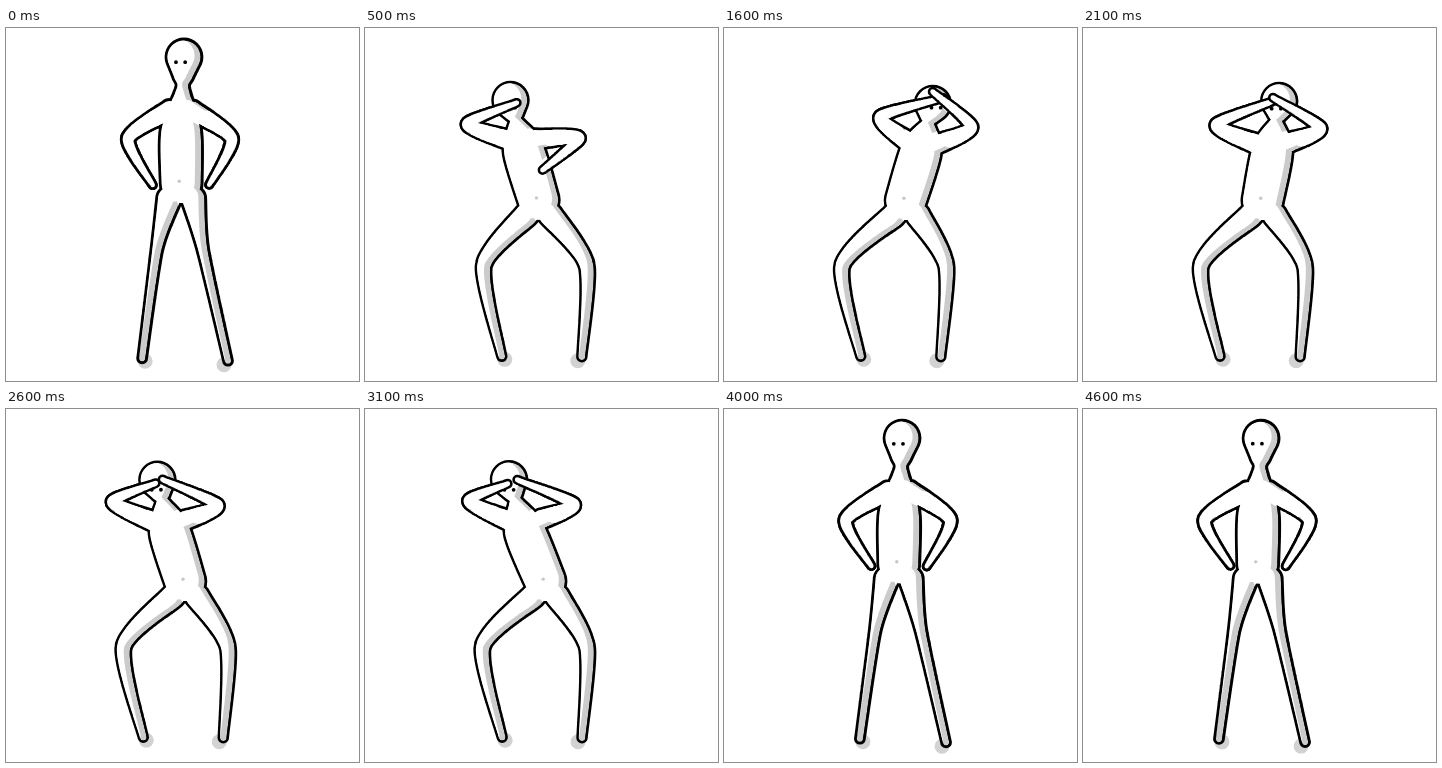
Write an HTML page with a canvas that moves like this. It is 353x353 px and loops after 4700 ms.

```html
<!DOCTYPE html>
<html lang="en">
<head>
<meta charset="utf-8">
<title>Dancing figure</title>
<style>
  html, body { margin: 0; width: 100%; height: 100%; overflow: hidden; background: #fff; }
  canvas { display: block; width: 353px; height: 353px; }
</style>
</head>
<body>
<canvas id="stage" width="353" height="353"></canvas>
<script>
const ctx = document.getElementById('stage').getContext('2d');
const LOOP = 4700, STEP = 100;

// Joints of a pose; each arm is shoulder, elbow, hand and each leg is knee, foot.
function pose(line, kneeSize, head, gaze, chest, pelvis, armL, armR, legL, legR) {
  return { line, kneeSize, joints: [head, gaze, chest, pelvis, ...armL, ...armR, ...legL, ...legR] };
}

const crouch = (...upper) =>
  pose(2.5, 8, ...upper, [[118, 238], [137, 328]], [[222, 238], [217, 329]]);

const stand = pose(2.8, 6, [178, 29], [174.5, 34.5], [175, 105], [175, 155],
  [[164, 82], [122, 111], [147, 157]], [[186, 82], [226, 111], [203, 157]],
  [[151, 222], [136, 330]], [[197, 222], [222, 333]]);

const salute = crouch([164, 73], [163.5, 81], [172, 123], [178, 172],
  [[160, 113], [120, 96], [171, 73]], [[184, 112], [229, 110], [187, 142]]);

const swayRight = crouch([209, 76], [212, 80], [197, 123], [182, 172],
  [[183, 113], [157, 89], [219, 70]], [[213, 116], [247, 99], [209, 64]]);

const cover = crouch([196, 73], [193.5, 81], [189, 123], [180, 172],
  [[171, 115], [134, 97], [193, 72]], [[207, 114], [237, 100], [190, 70]]);

const swayLeft = crouch([144, 70], [144, 81], [160, 123], [180, 172],
  [[143, 111], [104, 92], [143, 75]], [[176, 110], [209, 95], [152, 71]]);

// time, pose, sideways lean of the upper body
const KEYS = [
  [0, stand, 0], [550, salute, -19], [700, salute, -20], [1000, salute, 0],
  [1400, swayRight, 5], [1600, swayRight, 0], [2100, cover, 0], [2800, swayLeft, -4],
  [3100, swayLeft, 0], [3200, swayLeft, 0], [3800, stand, 0], [LOOP, stand, 0]
];

const mix = (a, b, u) => a + (b - a) * u;
const between = (p, q, u) => p.map((v, i) => mix(v, q[i], u));
const shift = ([x, y], dx, dy) => [x + dx, y + dy];

function poseAt(time) {
  const n = KEYS.findIndex(k => k[0] > time);
  const [t0, a, lean0] = KEYS[n - 1], [t1, b, lean1] = KEYS[n];
  const p = (time - t0) / (t1 - t0), u = p * p * (3 - 2 * p);
  const lean = mix(lean0, lean1, u), frame = time / STEP;
  return {
    line: mix(a.line, b.line, u),
    kneeSize: mix(a.kneeSize, b.kneeSize, u),
    joints: a.joints.map((joint, i) => {
      const q = between(joint, b.joints[i], u);
      const bend = lean * Math.max(0, Math.min(1, (200 - q[1]) / 110));
      // A slight wobble, as if every drawing were made anew.
      return shift(q, bend + 0.3 * Math.sin(frame * 7.3 + i * 2.9), 0.3 * Math.sin(frame * 5.1 + i * 4.7));
    })
  };
}

// Circles [x, y, r] along a smooth curve through the given ones.
function sweep(knots, steps = 40, bend = 0.35) {
  const circles = [];
  const at = i => knots[Math.max(0, Math.min(knots.length - 1, i))];
  for (let i = 0; i < knots.length - 1; i++) {
    const [p, q, r, s] = [at(i - 1), at(i), at(i + 1), at(i + 2)];
    for (let k = 0; k <= steps; k++) {
      const u = k / steps, v = 1 - u;
      circles.push(q.map((_, j) =>
        q[j] * v * v * (1 + 2 * u) + r[j] * u * u * (1 + 2 * v) +
        bend * u * v * ((r[j] - p[j]) * v - (s[j] - q[j]) * u)));
    }
  }
  return circles;
}

function shape(circles, grow) {
  const path = new Path2D();
  for (const [x, y, r] of circles) {
    path.moveTo(x + r + grow, y);
    path.arc(x, y, r + grow, 0, 7);
  }
  return path;
}

function fill(path, color) {
  ctx.fillStyle = color;
  ctx.fill(path);
}

const dot = ([x, y], r, color) => fill(shape([[x, y, r]], 0), color);

function shade(inside) {
  ctx.save();
  ctx.clip(inside);
  fill(inside, '#cbcbcb');
  ctx.translate(-6, -1.5);
  fill(inside, '#fff');
  ctx.restore();
}

function draw(time) {
  const { line, kneeSize, joints } = poseAt(time);
  const [head, gaze, chest, pelvis, ...limbs] = joints;
  const [legL, legR] = [limbs.slice(6, 8), limbs.slice(8)];
  const neck = between(head, chest, 0.41), half = line / 2;

  const spine = sweep([[...head, 18], [...between(head, neck, 0.55), 11], [...neck, 7],
    [...chest, 21], [...pelvis, 21]]);
  const arms = [limbs.slice(0, 3), limbs.slice(3, 6)].map(([shoulder, elbow, hand]) =>
    sweep([[...shoulder, 10.5], [...elbow, 7], [...hand, 3.7]]));
  const legs = [[legL, -12], [legR, 12]].map(([[knee, foot], side]) =>
    sweep([[...shift(pelvis, side, 15), 12.5], [...knee, kneeSize], [...foot, 4.5]], 60));

  ctx.fillStyle = '#fff';
  ctx.fillRect(0, 0, 353, 353);
  dot(shift(legL[1], 3, 3), 7.5, '#d2d2d2');
  dot(shift(legR[1], -4, 4), 7.5, '#d2d2d2');

  const figure = [...spine, ...arms.flat(), ...legs.flat()];
  fill(shape(figure, half), '#000');
  shade(shape(figure, -half));
  dot(shift(gaze, -4.6, 0), 1.9, '#000');
  dot(shift(gaze, 4.6, 0), 1.9, '#000');
  dot(shift(pelvis, -2, -2), 1.7, '#c8c8c8');

  // Forearms lie over the torso and face.
  for (const arm of arms) {
    fill(shape(arm.slice(35), half), '#000');
    fill(shape(arm.slice(15), -half), '#fff');
  }
}

function tick() {
  const time = performance.now() % LOOP;
  draw(Math.floor(time / STEP) * STEP);
  requestAnimationFrame(tick);
}
tick();
</script>
</body>
</html>
```
